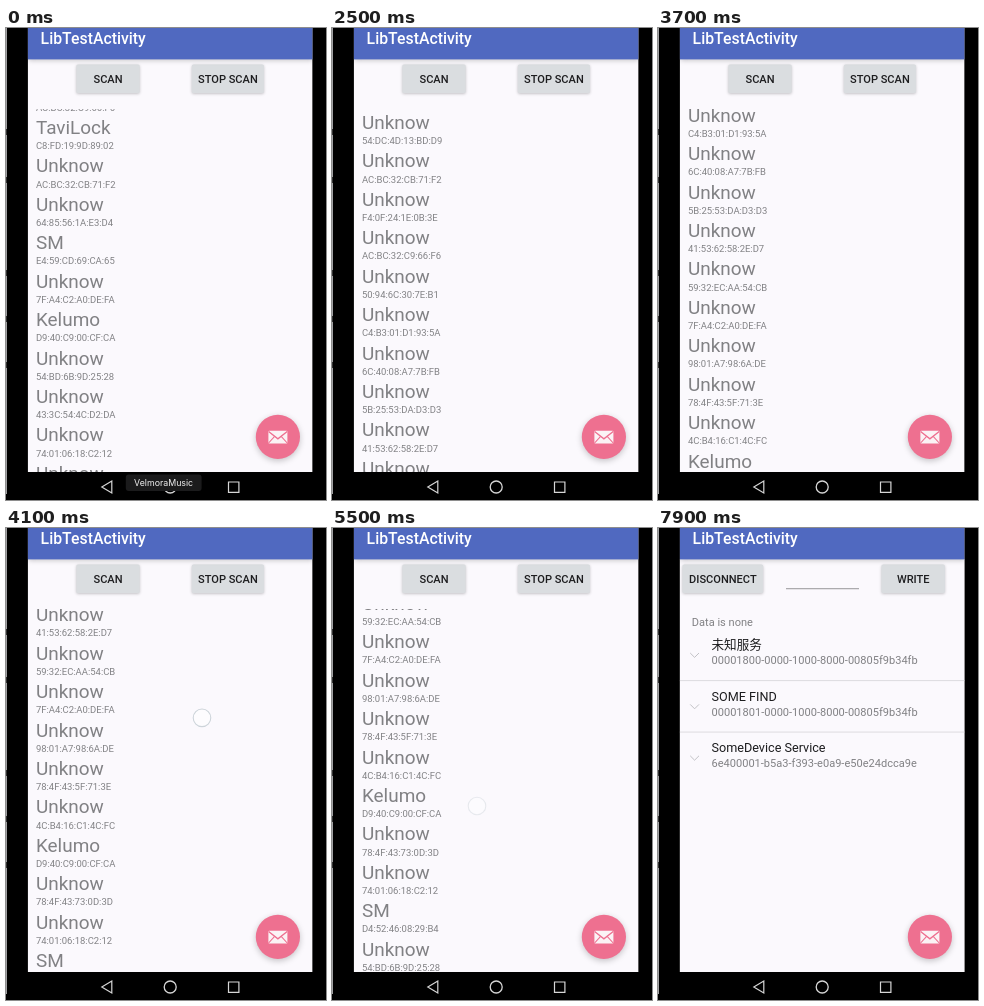
Write an HTML page with a canvas that moves like this. It is 320 px wide and 472 px high and loops after 8000 ms.

```html
<!DOCTYPE html>
<html lang="en">
<head>
<meta charset="utf-8">
<title>LibTestActivity</title>
<style>
html, body { margin: 0; width: 100%; height: 100%; overflow: hidden; background: #000; }
canvas { display: block; width: 320px; height: 472px; }
</style>
</head>
<body>
<canvas id="stage"></canvas>
<script>
const W = 320, H = 472, LOOP = 8000;
const LEFT = 21.7, RIGHT = 306.6, BOTTOM = 444;
const LIST_TOP = 81, FIRST_ROW = 81, PITCH = 38.43;
const ROBOTO = 'Roboto, "Noto Sans CJK SC", "Noto Sans CJK", sans-serif';
const PAPER = '#fbf9fd', GREY = '#818184', INK = '#1d1d1f', PINK = '#ee7090';

const canvas = document.getElementById('stage');
const ctx = canvas.getContext('2d');
const dpr = window.devicePixelRatio || 1;
canvas.width = W * dpr;
canvas.height = H * dpr;

// Rows are addresses, with a device name behind where one is known.
const parse = s => s.split(',').map(r => {
  const [mac, name = 'Unknow'] = r.split('=');
  return { mac, name };
});
const oldScan = parse('AC:BC:32:C9:66:F6,C8:FD:19:9D:89:02=TaviLock,AC:BC:32:CB:71:F2,' +
  '64:85:56:1A:E3:D4,E4:59:CD:69:CA:65=SM,7F:A4:C2:A0:DE:FA,D9:40:C9:00:CF:CA=Kelumo,' +
  '54:BD:6B:9D:25:28,43:3C:54:4C:D2:DA,74:01:06:18:C2:12,59:32:EC:AA:54:CB');
const newScan = parse('54:DC:4D:13:BD:D9,AC:BC:32:CB:71:F2,F4:0F:24:1E:0B:3E,' +
  'AC:BC:32:C9:66:F6,50:94:6C:30:7E:B1,C4:B3:01:D1:93:5A,6C:40:08:A7:7B:FB,' +
  '5B:25:53:DA:D3:D3,41:53:62:58:2E:D7,59:32:EC:AA:54:CB,7F:A4:C2:A0:DE:FA,' +
  '98:01:A7:98:6A:DE,78:4F:43:5F:71:3E,4C:B4:16:C1:4C:FC,D9:40:C9:00:CF:CA=Kelumo,' +
  '78:4F:43:73:0D:3D,74:01:06:18:C2:12,D4:52:46:08:29:B4=SM,54:BD:6B:9D:25:28,' +
  '43:3C:54:4C:D2:DA');
const services = [
  ['未知服务', '00001800-0000-1000-8000-00805f9b34fb'],
  ['SOME FIND', '00001801-0000-1000-8000-00805f9b34fb'],
  ['SomeDevice Service', '6e400001-b5a3-f393-e0a9-e50e24dcca9e']
];
const scrollKeys = [[2900, 0], [3300, 74], [3400, 104], [3750, 215], [4100, 315], [4250, 340], [4700, 365]];

const clamp = v => Math.max(0, Math.min(1, v));
const ramp = (t, a, b) => clamp((t - a) / (b - a));
const pulse = (t, a, b, fadeIn, fadeOut) => ramp(t, a, a + fadeIn) * (1 - ramp(t, b, b + fadeOut));

function along(keys, t) {
  let v = keys[0][1];
  for (let i = 1; i < keys.length; i++) {
    v += (keys[i][1] - keys[i - 1][1]) * ramp(t, keys[i - 1][0], keys[i][0]);
  }
  return v;
}

function text(s, x, y, size, color, weight = 400, align = 'left', family = ROBOTO) {
  ctx.font = `${weight} ${size}px ${family}`;
  ctx.textAlign = align;
  ctx.fillStyle = color;
  ctx.fillText(s, x, y);
}

function rect(x, y, w, h, color) {
  ctx.fillStyle = color;
  ctx.fillRect(x, y, w, h);
}

function round(x, y, w, h, r, color) {
  ctx.beginPath();
  ctx.roundRect(x, y, w, h, r);
  ctx.fillStyle = color;
  ctx.fill();
}

function line(points, color, width, close) {
  ctx.beginPath();
  points.forEach(([x, y]) => ctx.lineTo(x, y));
  if (close) ctx.closePath();
  ctx.strokeStyle = color;
  ctx.lineWidth = width;
  ctx.stroke();
}

function disc(x, y, r, color) {
  ctx.beginPath();
  ctx.arc(x, y, r, 0, 7);
  ctx.fillStyle = color;
  ctx.fill();
}

function ring(x, y, r, color, width) {
  ctx.beginPath();
  ctx.arc(x, y, r, 0, 7);
  ctx.strokeStyle = color;
  ctx.lineWidth = width;
  ctx.stroke();
}

function poly(points, color) {
  ctx.beginPath();
  points.forEach(([x, y]) => ctx.lineTo(x, y));
  ctx.fillStyle = color;
  ctx.fill();
}

// Runs a drawing with its own alpha and, if wanted, a drop shadow.
function layer(alpha, draw, blur = 0, dy = 0) {
  if (alpha <= 0) return;
  ctx.save();
  ctx.globalAlpha *= alpha;
  if (blur) {
    ctx.shadowColor = 'rgba(0,0,0,.22)';
    ctx.shadowBlur = blur * dpr;
    ctx.shadowOffsetY = dy * dpr;
  }
  draw();
  ctx.restore();
}

function button(label, x, w) {
  layer(1, () => round(x, 36.5, w, 28.6, 1.6, '#dadde0'), 3, 0.8);
  text(label, x + w / 2, 54.8, 11.05, INK, 500, 'center');
}

function appBar() {
  layer(1, () => rect(LEFT, -8, RIGHT - LEFT, 39.4, '#5069c0'), 5, 1.5);
  text('LibTestActivity', 34.6, 15.8, 15.8, '#fff', 500);
}

function rows(list, scroll, count) {
  ctx.save();
  ctx.beginPath();
  ctx.rect(LEFT, LIST_TOP, RIGHT - LEFT, BOTTOM - LIST_TOP);
  ctx.clip();
  list.slice(0, count).forEach((row, i) => {
    const y = FIRST_ROW + i * PITCH - scroll;
    if (y < LIST_TOP - PITCH || y > BOTTOM) return;
    text(row.name, 29.9, y + 20, 18.95, GREY);
    text(row.mac, 29.9, y + 35.1, 9.47, GREY);
  });
  ctx.restore();
}

function scanPage(t) {
  button('SCAN', 70.3, 63.4);
  button('STOP SCAN', 185.8, 72.2);
  if (t < 1600) rows(oldScan, 33.4, oldScan.length);
  else rows(newScan, along(scrollKeys, t), t < 2400 ? Math.floor((t - 1600) / 75) : newScan.length);
}

function servicePage(t) {
  rect(LEFT, 31, RIGHT - LEFT, BOTTOM - 31, PAPER);
  button('DISCONNECT', 24.5, 80.7);
  button('WRITE', 223.5, 63.4);
  rect(128, 60.3, 73, 0.9, '#8b8b8e');
  text('Data is none', 33.8, 98, 11.05, GREY);
  if (t < 6500) return;
  services.forEach(([name, id], i) => {
    const y = i * 51.4;
    text(name, 53.5, 121.3 + y, 12.63, INK);
    text(id, 53.5, 136.2 + y, 11.05, GREY);
    line([[32.2, 125 + y], [36.6, 129.4 + y], [41, 125 + y]], '#c2c2c6', 1);
    if (i < 2) rect(LEFT, 152.2 + y, RIGHT - LEFT, 0.9, '#d9d7dc');
  });
}

function mailButton() {
  layer(1, () => disc(271.9, 408.9, 22.1, PINK), 6, 2);
  round(262.4, 402.8, 19, 12.6, 1, '#fbf3f5');
  line([[262.6, 403.4], [271.9, 410.8], [281.2, 403.4]], PINK, 1.3);
  line([[262.6, 415], [268.6, 408.4]], PINK, 1.1);
  line([[281.2, 415], [275.2, 408.4]], PINK, 1.1);
}

function navBar() {
  rect(LEFT, BOTTOM, RIGHT - LEFT, H - BOTTOM, '#000');
  const c = '#d6d6d6';
  line([[95.8, 459], [105.8, 453], [105.8, 465]], c, 1.2, true);
  ring(164.2, 459, 6, c, 1.3);
  line([[222.5, 454], [232.9, 454], [232.9, 464.4], [222.5, 464.4]], c, 1.2, true);
}

function dot(x, y, alpha) {
  layer(alpha, () => {
    disc(x, y, 9, 'rgba(255,255,255,.6)');
    ring(x, y, 8.8, '#cdd4da', 1.1);
  });
}

function touches(t) {
  const s = along(scrollKeys, t);
  dot(205 - 3 * ramp(t, 2900, 3300), 269 - s, pulse(t, 2880, 3400, 20, 60));
  dot(200 - 4 * ramp(t, 3750, 4100), 505 - s, pulse(t, 3750, 4250, 20, 60));
  dot(145, 278, pulse(t, 5300, 5420, 40, 150));
}

function tooltip() {
  round(119.8, 446.5, 75.8, 16.5, 3, '#1b1b1c');
  text('VelmoraMusic', 157.6, 457.8, 8.8, '#f1f1f1', 400, 'center', 'Inter, sans-serif');
}

function playerBar() {
  const c = '#a4a4a5';
  rect(0, 458, W, 14, '#2d2d2e');
  poly([[7.8, 460.4], [16, 465.4], [7.8, 470.4]], c);
  text('00:01', 25.2, 468.7, 7.8, c, 400, 'left', 'Inter, sans-serif');
  text('-00:30', 253, 468.7, 7.8, c, 400, 'left', 'Inter, sans-serif');
  rect(55, 465, 194, 1.2, '#626264');
  rect(55, 465, 5, 1.2, '#8f8f90');
  round(59.4, 461, 2, 9, 0.8, '#b4b4b5');
  poly([[287, 464], [289, 464], [292.4, 461.5], [292.4, 469.5], [289, 467], [287, 467]], c);
  for (let i = 0; i < 3; i++) {
    ctx.beginPath();
    ctx.arc(291.5, 465.5, 3.4 + i * 2.3, -0.75, 0.75);
    ctx.strokeStyle = c;
    ctx.lineWidth = 0.8;
    ctx.stroke();
  }
  line([[314, 467.5], [312, 467.5], [312, 461.7], [322, 461.7]], c, 0.9);
  poly([[313.5, 470], [317, 466], [320.5, 470]], c);
}

function render(t) {
  ctx.setTransform(dpr, 0, 0, dpr, 0, 0);
  rect(0, 0, W, H, '#000');
  rect(0, 0, 1, 466, '#a2a2a4');
  [104, 152, 245, 291, 337].forEach(y => rect(0, y - 3, 1, 6, '#333'));

  ctx.save();
  ctx.beginPath();
  ctx.rect(LEFT, 0, RIGHT - LEFT, BOTTOM);
  ctx.clip();
  rect(LEFT, 0, RIGHT - LEFT, BOTTOM, PAPER);
  const shown = ramp(t, 5620, 5850);
  if (shown < 1) scanPage(t);
  layer(shown, () => {
    ctx.translate(0, 24 * (1 - shown) ** 2);
    servicePage(t);
  });
  appBar();
  mailButton();
  touches(t);
  ctx.restore();

  navBar();
  layer(1 - ramp(t, 120, 320), tooltip);
  layer(pulse(t, 300, 1500, 200, 300), playerBar);
}

const start = performance.now();
function tick() {
  render((performance.now() - start) % LOOP);
  requestAnimationFrame(tick);
}
tick();
</script>
</body>
</html>
```
